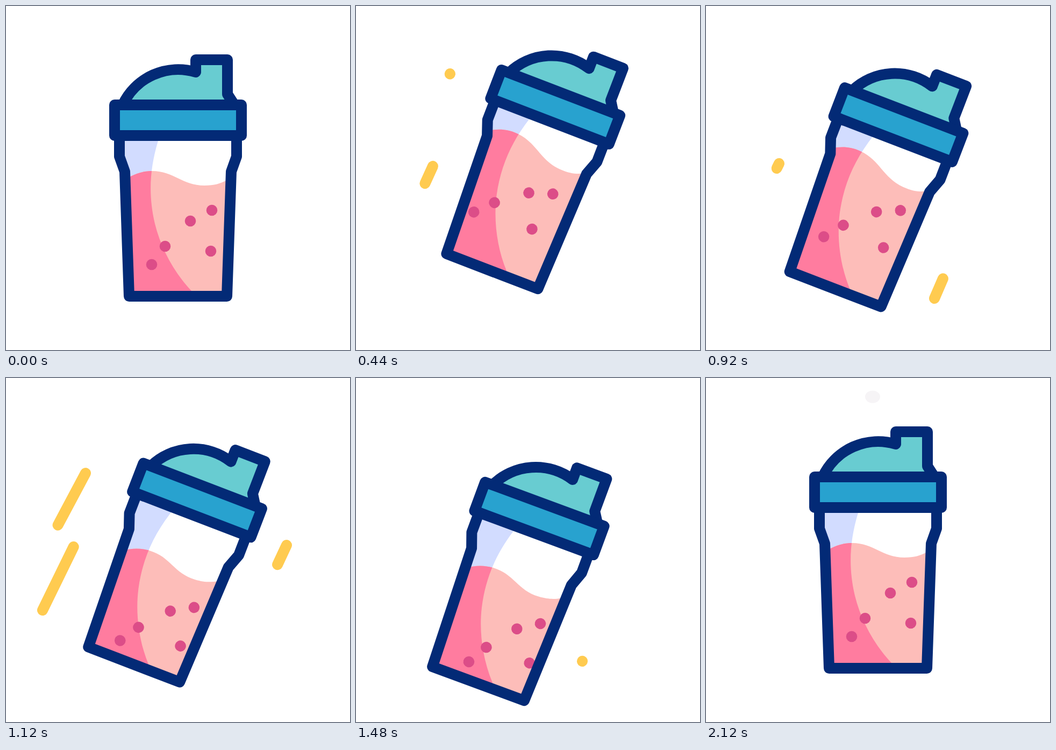
Recreate the animation shown at these times as an HTML page. Size 640 by 640 pixels, loop 2.44 s.

```html
<!DOCTYPE html>
<html>
<head>
<meta charset="utf-8">
<style>
  html, body { margin: 0; height: 100%; overflow: hidden; background: #fff; }
  svg { display: block; width: 100vw; height: 100vh; fill: none; stroke-width: 20; stroke-linecap: round; stroke-linejoin: round; }
  .ink { stroke: #032a76; }
</style>
</head>
<body>
<svg viewBox="0 0 640 640">
  <defs>
    <clipPath id="inside"><path d="M211 245V280L221 308L229 540H411L419 308L429 280V245Z"/></clipPath>
    <clipPath id="shade"><path id="edge" d="M283 251C268 300 264 350 277 405C288 450 312 495 345 530V560H150V240H286Z"/></clipPath>
  </defs>
  <g id="streaks"></g>
  <g id="shaker">
    <g clip-path="url(#inside)">
      <path fill="#fff" d="M200 240H440V560H200Z"/>
      <path fill="#d2dcff" clip-path="url(#shade)" d="M200 240H440V560H200Z"/>
      <path class="liquid" fill="#fdbdb9"/>
      <g clip-path="url(#shade)"><path class="liquid" fill="#ff7c9f"/></g>
      <g id="bubbles" fill="#dc4d88"></g>
    </g>
    <path class="ink" d="M211 241V280L221 308L229 540H411L419 308L429 280V241"/>
    <path class="ink" fill="#68ccd1" d="M217 184A114 114 0 0 1 353 123V100H412V164L423 181"/>
    <path class="ink" fill="#28a2cf" d="M202 184H438V241H202Z"/>
  </g>
  <ellipse id="mist" cx="310" cy="35" rx="14" ry="11.5" fill="#f6f4f6"/>
</svg>
<script>
const LOOP = 2440, STEP = 40, FIRST = 240, LAST = 2120;
const RISE = 200, TOP = 395, PERIOD = 420, RELEASE = 1445;
const TILT = 21, LAG = 180;
const RAD = Math.PI / 180;

const $ = id => document.getElementById(id);
const smooth = x => { x = Math.min(1, Math.max(0, x)); return x * x * (3 - 2 * x); };

function add(parent, tag, attrs) {
  const el = document.createElementNS("http://www.w3.org/2000/svg", tag);
  for (const key in attrs) el.setAttribute(key, attrs[key]);
  return parent.appendChild(el);
}

const YELLOW = "#ffcb50", PINK = "#dc4d88";
// path, start time, time for each end to run the path, colour
const streaks = [
  ["M143 298L79 439", 375, 210, YELLOW],
  ["M175 126L89 307", 433, 210, YELLOW],
  ["M524 315L425 544", 531, 280, YELLOW],
  ["M136 293L68 432", 886, 220, YELLOW],
  ["M148 177L74 316", 987, 210, YELLOW],
  ["M522 311L421 527", 1055, 250, YELLOW],
  ["M414 71Q417 34 448 21", 1571, 210, PINK],
  ["M394 73Q393 35 368 22", 1650, 210, PINK],
  ["M359 72Q342 42 310 35", 1712, 210, PINK]
].map(([d, start, span, stroke]) =>
  ({ start, span, el: add($("streaks"), "path", { d, stroke, pathLength: 1 }) }));

for (const [cx, cy] of [[383, 380], [343, 400], [296, 447], [381, 456], [271, 481]])
  add($("bubbles"), "circle", { cx, cy, r: 10.3 });

const liquids = document.querySelectorAll(".liquid");
for (const el of liquids)
  el.setAttribute("d", "M200 338C226 320 242 307 272 307C312 307 328 334 369 334C388 334 399 330 409 325L440 310V700H200Z");

function pose(t) {
  const phase = 360 * (t - TOP) / PERIOD;
  const wave = shift => Math.cos((phase - shift) * RAD);
  let lean = 1, slide = 1.5 - 45.4 * wave(0);
  if (t < TOP) {
    lean = smooth((t - RISE) / (TOP - RISE));
    slide = -43.9 * lean;
  } else if (t > RELEASE) {
    lean = 1 - smooth((t - RELEASE) / 315);
    slide = 46.9 * lean;
  }
  const fade = t < TOP ? lean : 1;
  const sink = t < 1520 ? -24 * wave(65) * fade : 24 * (1 - smooth((t - 1520) / 260));
  const swirl = t < 1674 ? (9.8 - 0.0022 * t) * wave(16) * fade : 6.1 * (1 - smooth((t - 1674) / 220));
  return { lean, slide, sink, swirl };
}

function draw(t) {
  const { lean, slide, sink, swirl } = pose(t);
  const x = -slide * Math.sin(TILT * RAD), y = slide * Math.cos(TILT * RAD);
  $("shaker").setAttribute("transform", `translate(${x} ${y}) rotate(${TILT * lean} 320 320)`);
  $("bubbles").setAttribute("transform", `translate(${-2 * swirl} ${sink}) rotate(${swirl} 340 433)`);
  for (const el of liquids)
    el.setAttribute("transform", `matrix(1 ${-0.0031 * sink} 0 1 0 ${1.914 * sink})`);
  for (const { el, start, span } of streaks) {
    const head = smooth((t - start) / span), tail = smooth((t - start - LAG) / span);
    el.style.display = head > 0 && tail < 1 ? "" : "none";
    el.setAttribute("stroke-dasharray", `${Math.max(0.001, head - tail)} 9`);
    el.setAttribute("stroke-dashoffset", -tail);
  }
  $("mist").style.display = t >= LAST ? "" : "none";
}

const begin = performance.now();
function tick() {
  const now = (performance.now() - begin) % LOOP;
  draw(now < FIRST ? 0 : Math.min(LAST, Math.floor(now / STEP) * STEP));
  requestAnimationFrame(tick);
}
tick();
</script>
</body>
</html>
```
